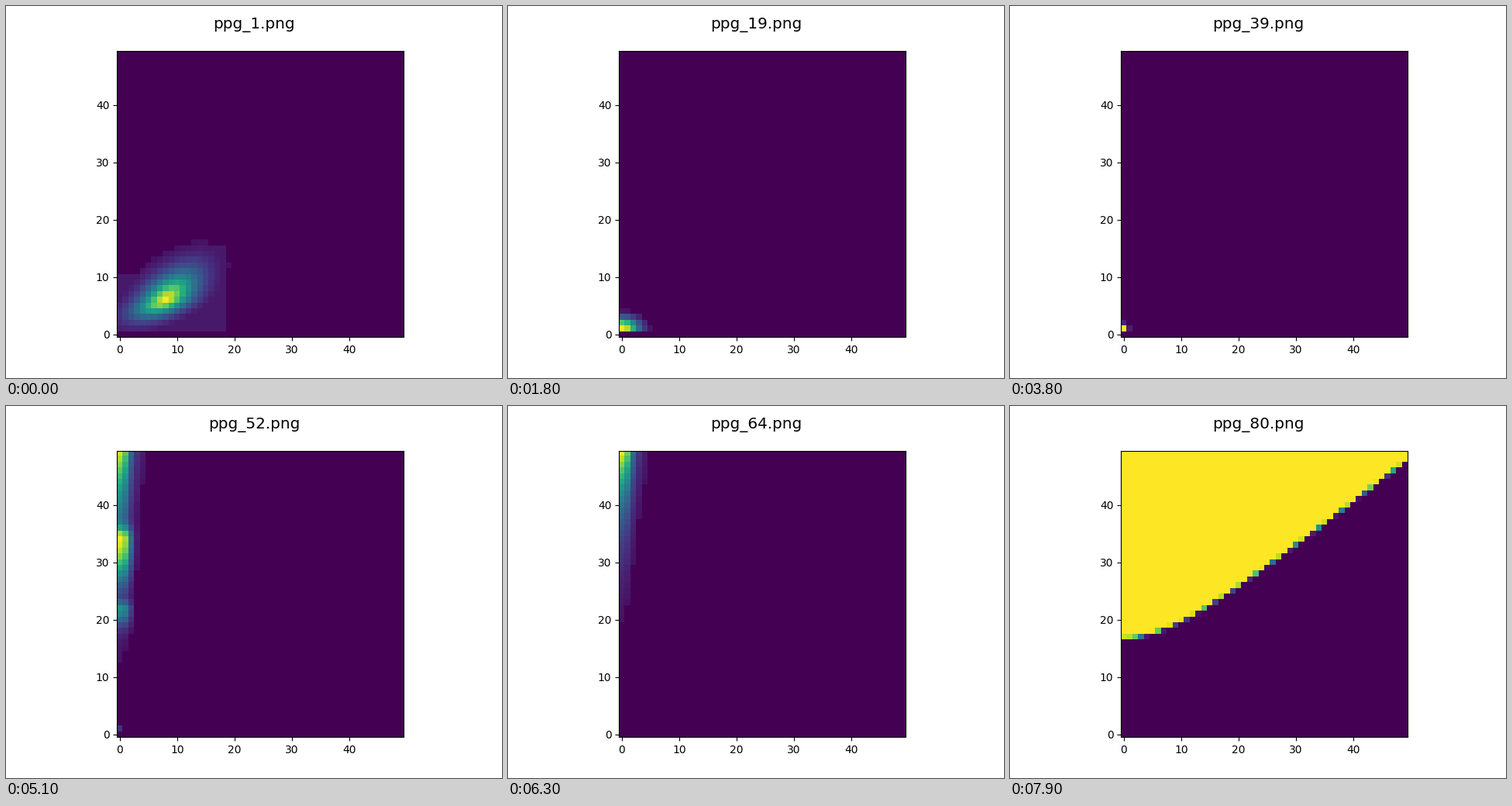
A matplotlib script that plays this animation: 640 by 480 pixels, repeating every 8000 ms.

```python
import numpy as np
import matplotlib.pyplot as plt
from matplotlib.animation import FuncAnimation

plt.rcParams["text.kerning_factor"] = 6

SIZE = 50
FRAMES = 80
row, col = np.mgrid[0:SIZE, 0:SIZE].astype(float)

DECAY = 9.5
FALLOFF = np.log1p(0.28 * col**2.7)
# Height of the saturated front over the columns, early and late
EARLY = 30.86 + 2.7 * np.log1p(np.exp((col - 8.6) / 2.5))
LATE = 16.75 + 0.8 * (np.hypot(col, 12) - 12)


def mix(a, b, u):
    return a + (b - a) * u


def blob(n):
    """Tilted cloud that slides into the lower left corner."""
    u = (n - 1) / 18
    k = (1 - u) ** 1.3
    dx, dy = col - 8 * k, row - 1 - 5 * k
    dy = np.where(dy < 0, (1 + 0.6 * k) * dy, dy)
    xx, yy, xy = mix(13, 4.2, u), mix(11, 1.61, u), 7 * (1 - u)
    q = (yy * dx**2 + xx * dy**2 - 2 * xy * dx * dy) / (xx * yy - xy**2)
    core = np.exp(-(q / 2) ** (1 - 0.27 * k))
    skirt = (col <= 18 * k) & (row <= (10 + 0.32 * col) * k)
    return np.maximum(core, 0.07 * skirt)


def corner(n):
    sx = np.interp(n, [19, 28], [2.05, 0.45])
    sy = np.interp(n, [19, 28, 37], [1.27, 0.52, 0.46])
    return np.exp(-((col / sx) ** 2 + ((row - 1) / sy) ** 2) / 2)


def bump(at, amp, above, below):
    d = row - at
    profile = np.exp(-((d / np.where(d > 0, above, below)) ** 2) / 2)
    return amp * profile / (1 + np.exp(2.5 * (col - 1.8)))


def strip(n):
    """Band that hangs down from the upper left corner."""
    tau = np.interp(n, [40, 46, 52, 64], [4, 6, 12, DECAY])
    swell = np.interp(n, [46, 52, 60], [0, 1, 0])
    band = 0.95 * np.exp((row - 49) / tau - FALLOFF)
    return band + swell * (bump(34, 0.73, 1.4, 4.8) + bump(22, 0.38, 0.8, 2.2))


def front(n):
    """Saturated region whose boundary sharpens, then sweeps down."""
    if n < 72:
        u = (n - 64) / 8
        bound = mix(DECAY * FALLOFF, EARLY - EARLY[0, 0], u)
        bound = bound + EARLY[0, 0] + 30 * (1 - u) ** 1.5
        width = DECAY * (0.15 / DECAY) ** u
    else:
        u = (n - 72) / 8
        bound = mix(EARLY, LATE, u**1.4)
        width = mix(0.15, 0.1, u)
    return 1 / (1 + np.exp(np.clip((bound - row) / width, -60, 60)))


def field(n):
    if n <= 19:
        z = blob(n)
    elif n <= 64:
        z = corner(n) + 8 * np.exp(0.4 * (n - 52)) * strip(n)
    else:
        z = front(n)
    z[0] = 0
    z /= z.max()
    z[z < (0.046 if n <= 66 else 0.02)] = 0
    return z


fig, ax = plt.subplots(figsize=(6.4, 4.8), dpi=100)
image = ax.imshow(field(1), origin="lower", cmap="viridis", vmin=0, vmax=1)
title = fig.text(0.5, 451 / 480, "", fontsize=14.4, ha="center", va="baseline")


def update(i):
    n = i + 1
    image.set_data(field(n))
    title.set_text(f"ppg_{n}.png")
    return image, title


anim = FuncAnimation(fig, update, frames=FRAMES, interval=100,
                     repeat=True, repeat_delay=0)
plt.show()
```
